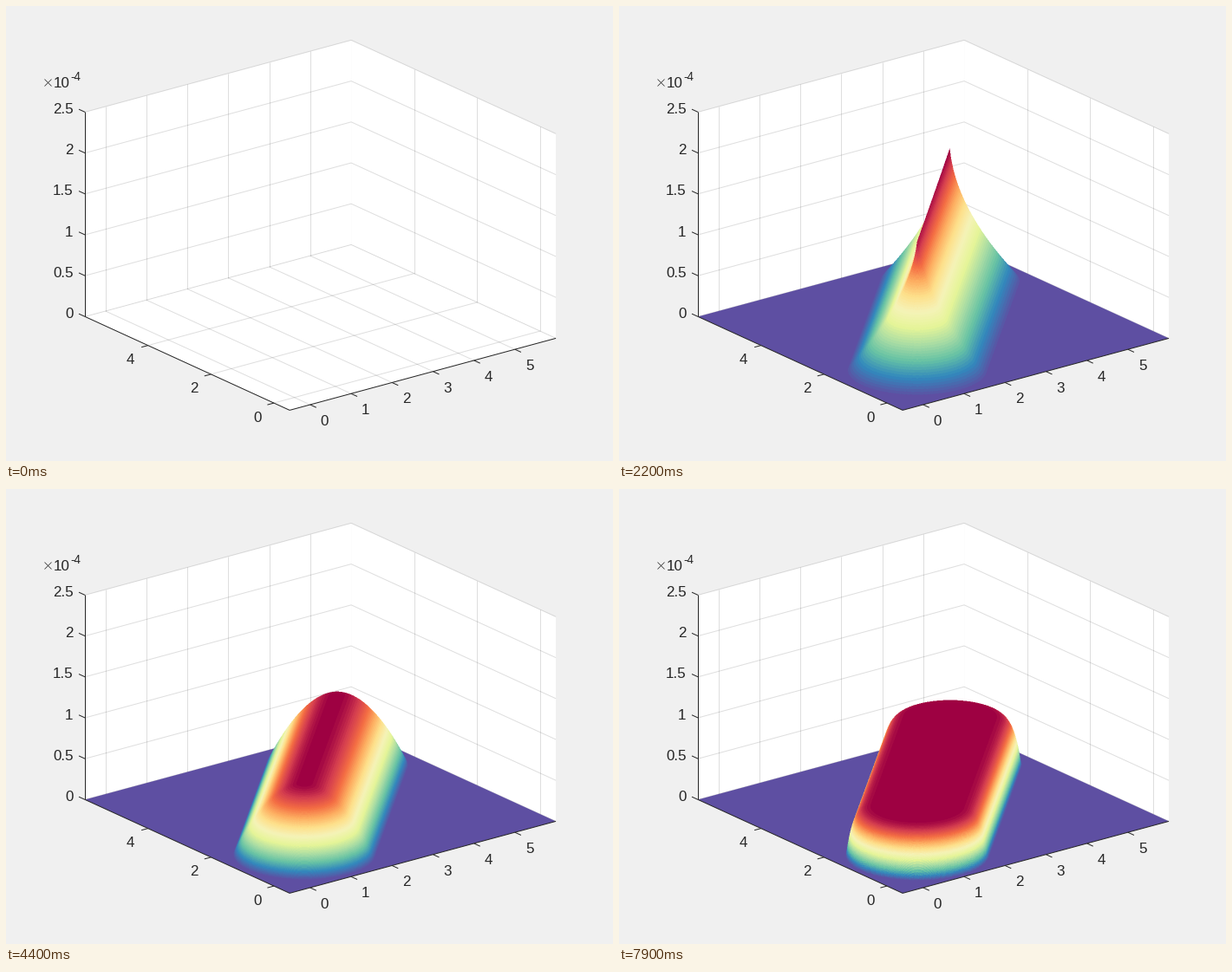
A matplotlib script for the animation above (8 s loop, 700 by 525 pixels).

```python
import numpy as np
import matplotlib.pyplot as plt
from matplotlib.animation import FuncAnimation
from matplotlib.colors import LinearSegmentedColormap

W, H, DPI = 700, 525, 100
INK = "#262626"
LO, HI = -0.5, 6.0
ZMAX = 2.5          # in units of 1e-4
ZPX = 94.4          # pixels per 1e-4
ORIGIN = np.array([327.1, 466.4])
EX = np.array([307, -83]) / 6.5
EY = np.array([-236, -108]) / 6.5
EZ = np.array([0, -ZPX])

plt.rcParams["font.family"] = "Liberation Sans"
fig = plt.figure(figsize=(W / DPI, H / DPI), dpi=DPI, facecolor="#f0f0f0")
ax = fig.add_axes([0, 0, 1, 1])
ax.axis("off")


def project(x, y, z):
    return ORIGIN + (x - LO) * EX + (y - LO) * EY + z * EZ


def line(p, q, **style):
    style = {"color": INK, "lw": 0.72, **style}
    ax.plot([p[0], q[0]], [p[1], q[1]], solid_capstyle="butt", **style)


def face(corners, color, zorder):
    poly = plt.Polygon([project(*c) for c in corners], fc=color, ec="none",
                       zorder=zorder)
    return ax.add_patch(poly)


def grid(p, q):
    line(project(*p), project(*q), alpha=0.15, zorder=2)


def label(x, y, text, size=17, ha="center"):
    ax.text(x, y + 6.4, text, size=size * 72 / DPI, color=INK, ha=ha,
            va="baseline", zorder=7)


def tick(p, direction):
    line(p, p + 7.8 * direction / np.hypot(*direction), zorder=6)


def draw_box():
    face([(LO, HI, 0), (HI, HI, 0), (HI, HI, ZMAX), (LO, HI, ZMAX)], "white", 1)
    face([(HI, LO, 0), (HI, HI, 0), (HI, HI, ZMAX), (HI, LO, ZMAX)], "white", 1)
    face(FLOOR, "white", 1)
    for x in range(6):
        grid((x, HI, 0), (x, HI, ZMAX))
        grid((x, LO, 0), (x, HI, 0))
        tick(project(x, LO, 0), -EY)
        label(367.3 + 47.3 * x, 477.6 - 12.8 * x, str(x))
    for y in (0, 2, 4):
        grid((HI, y, 0), (HI, y, ZMAX))
        grid((LO, y, 0), (HI, y, 0))
        tick(project(LO, y, 0), -EX)
        label(290.2 - 36.6 * y, 473.2 - 16.7 * y, str(y))
    for z in np.arange(0, 2.6, 0.5):
        grid((LO, HI, z), (HI, HI, z))
        grid((HI, HI, z), (HI, LO, z))
        tick(project(LO, HI, z), EY)
        label(77.5, 354 - 94.6 * z, f"{z:g}", ha="right")
    front = project(LO, LO, 0)
    line(project(LO, HI, 0), project(LO, HI, ZMAX), zorder=6)
    line(project(LO, HI, 0), front, zorder=6)
    line(front, project(HI, LO, 0), zorder=6)
    line((44.5, 84.5), (52.5, 92.5), lw=0.5, zorder=6)
    line((44.5, 92.5), (52.5, 84.5), lw=0.5, zorder=6)
    label(54.5, 87.2, "10", ha="left")
    label(74, 79.2, "-4", size=13.5, ha="left")


FLOOR = [(LO, LO, 0), (HI, LO, 0), (HI, HI, 0), (LO, HI, 0)]
draw_box()
SPECTRUM = ["#5e4fa2", "#3288bd", "#66c2a5", "#abdda4", "#e6f598", "#f5f3b8",
            "#fee08b", "#fdae61", "#f46d43", "#d53e4f", "#9e0142"]
cmap = LinearSegmentedColormap.from_list("height", SPECTRUM, 64)
floor = face(FLOOR, cmap(0), 3)

# Distance from every grid node to the slightly tilted ridge segment.
N, RADIUS = 201, 1.38
START, END = np.array([1.007, 0.993]), np.array([4.5009, 4.4991])
nodes = np.linspace(LO, HI, N)
pos = np.stack(np.meshgrid(nodes, nodes, indexing="ij"), -1)
run = END - START
along = np.clip((pos - START) @ run / (run @ run), 0, 1)
rho = np.linalg.norm(pos - START - along[..., None] * run, axis=-1) / RADIUS

# Floor samples per screen column, ordered front to back.
SS = 2
X0, X1, Y0, Y1 = 258, 468, 78, 456
cols = X0 + (np.arange((X1 - X0) * SS) + 0.5) / SS
rows = Y0 + (np.arange((Y1 - Y0) * SS) + 0.5) / SS
base = np.arange(Y1, 286, -0.2)
uu, vv = np.meshgrid(cols, base)
offsets = np.stack([uu - ORIGIN[0], vv - ORIGIN[1]])
cell = np.einsum("ij,jkl->ikl", np.linalg.inv(np.column_stack([EX, EY])), offsets)
cell = np.clip(cell / (nodes[1] - nodes[0]), 0, N - 1.001)
ci, cj = cell.astype(int)
fi, fj = cell[0] - ci, cell[1] - cj
far, near = np.maximum(fi, fj), np.minimum(fi, fj)
mi, mj = ci + (fi > fj), cj + (fi <= fj)


def surface(p):
    """Unit-sum profile 1 - rho^p, scaled to 1e-4."""
    z = np.clip(1 - rho ** p, 0, None)
    return z / z.sum() * 1e4


def render(p):
    z = surface(p)
    height = (z[ci, cj] * (1 - far) + z[mi, mj] * (far - near)
              + z[ci + 1, cj + 1] * near)
    skyline = np.minimum.accumulate(vv - ZPX * np.minimum(height, ZMAX), axis=0)
    hit = np.stack([np.searchsorted(-s, -rows) for s in skyline.T], axis=1)
    seen = hit < len(base)
    top = height[np.minimum(hit, len(base) - 1), np.arange(len(cols))]
    level = np.minimum(64 * top / z.max(), 63).astype(int)
    rgba = cmap(level) * (seen & (top > 0))[..., None]
    rgba = rgba.reshape(Y1 - Y0, SS, X1 - X0, SS, 4).mean(axis=(1, 3))
    rgba[..., :3] /= np.maximum(rgba[..., 3:], 1e-6)
    return np.clip(rgba, 0, 1)


image = ax.imshow(np.zeros((Y1 - Y0, X1 - X0, 4)), extent=(X0, X1, Y1, Y0),
                  interpolation="nearest", aspect="auto", zorder=4)
ax.set_xlim(0, W)
ax.set_ylim(H, 0)

FRAMES, HALF = 80, 40
powers = np.concatenate([np.linspace(0, 1, HALF), np.linspace(1, 10, HALF)])


def update(k):
    shown = k > 0
    floor.set_visible(shown)
    image.set_visible(shown)
    if shown:
        image.set_data(render(powers[k]))
    return floor, image


anim = FuncAnimation(fig, update, frames=FRAMES, interval=100, repeat=True,
                     repeat_delay=0, init_func=lambda: update(0))
plt.show()
```
